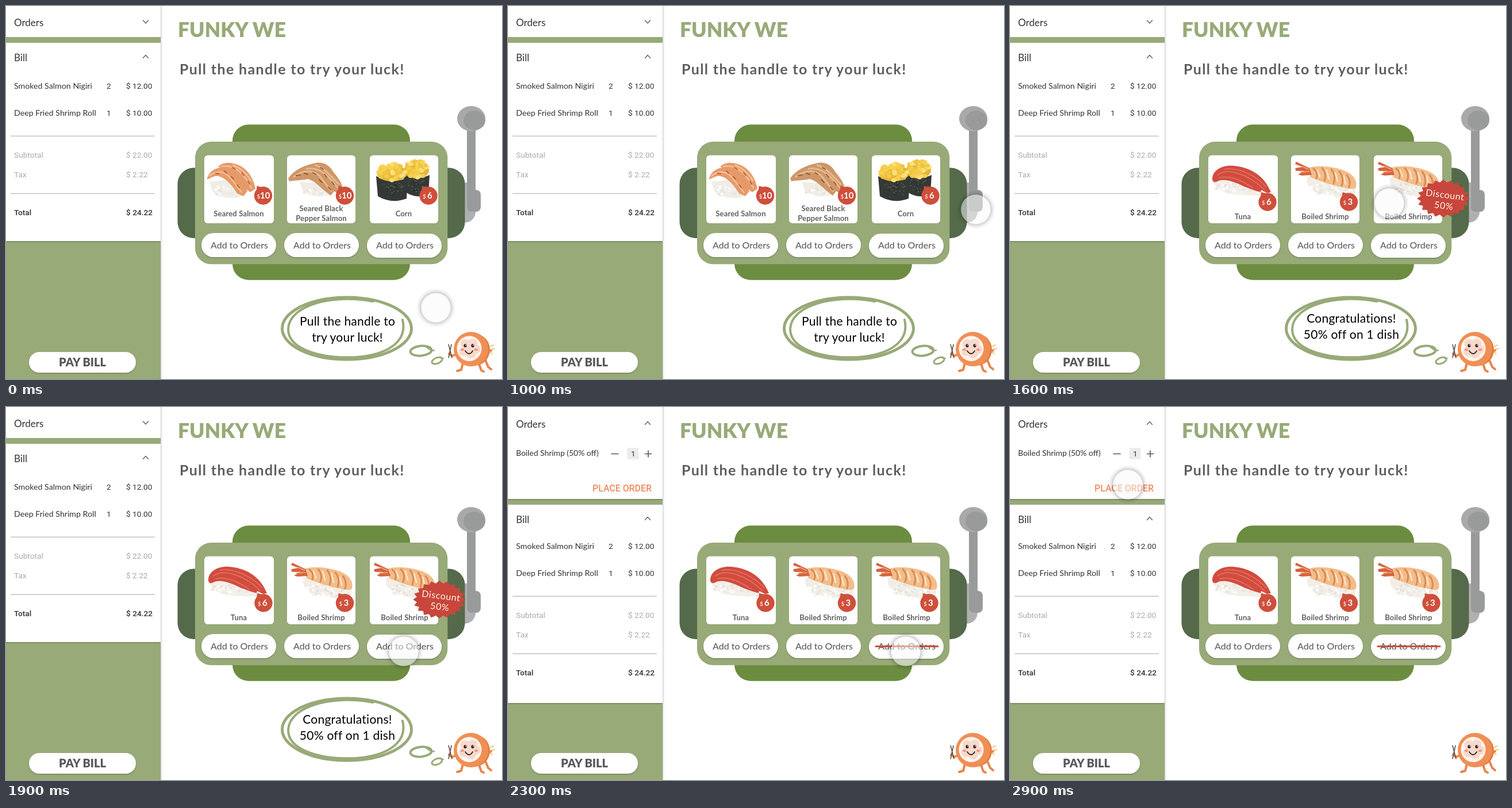
These frames come from a looping animation (863 by 649 pixels, 3 s). An HTML page:

```html
<!DOCTYPE html>
<html lang="en">
<head>
<meta charset="utf-8">
<title>Dish machine</title>
<style>
  html, body { margin: 0; width: 100%; height: 100%; overflow: hidden; background: #fff; }
  svg { display: block; width: 863px; height: 649px; font-family: Lato, sans-serif; }
  .num { font-family: Roboto, sans-serif; font-size: 13.7px; }
  .total { font-weight: 500; }
  .item { font-size: 14.2px; }
  .head { font-size: 17px; }
  .dim { fill: #aaa; }
  .label { font-size: 13px; font-weight: 700; letter-spacing: .15px; fill: #606060; text-anchor: middle; }
  .add { font-size: 16px; font-weight: 500; fill: #606060; text-anchor: middle; }
  .speech { font: 21px "Comic Sans MS", "Comic Neue", Lato, sans-serif; letter-spacing: .25px; fill: #000; text-anchor: middle; }
  .line { fill: none; stroke-linecap: round; stroke-linejoin: round; }
</style>
</head>
<body>
<svg id="stage" viewBox="0 0 863 649"></svg>
<script>
const GREEN = '#98aa78', RED = '#cf4f3b';
const stage = document.getElementById('stage');

const text = (x, y, str, cls = '', extra = '') => `<text x="${x}" y="${y}" class="${cls}" ${extra}>${str}</text>`;
const rect = (x, y, w, h, fill, r = 0, extra = '') =>
  `<rect x="${x}" y="${y}" width="${w}" height="${h}" rx="${r}" fill="${fill}" ${extra}/>`;
const oval = (x, y, rx, ry, fill, extra = '') =>
  `<ellipse cx="${x}" cy="${y}" rx="${rx}" ry="${ry}" fill="${fill}" ${extra}/>`;
const shape = (d, fill) => `<path d="${d}" fill="${fill}"/>`;
const line = (d, color, width = 1.5) => `<path class="line" d="${d}" stroke="${color}" stroke-width="${width}"/>`;
const group = (id, ...parts) => `<g id="${id}">${parts.join('')}</g>`;
const at = (x, y, art) => `<g transform="translate(${x} ${y})">${art}</g>`;
const chevron = (y, up) => line(up ? `M238.5 ${y + 2.5}l4.5-5 4.5 5` : `M238.5 ${y - 2.5}l4.5 5 4.5-5`, '#666');

let seed = 7;
const random = () => (seed = seed * 16807 % 2147483647) / 2147483647;

// Scatters grains inside an ellipse.
function grains(count, cx, cy, rx, ry, size, colors) {
  let out = '';
  for (let i = 0; i < count; i++) {
    const a = random() * 6.283, r = Math.sqrt(random());
    out += oval((cx + rx * r * Math.cos(a)).toFixed(1), (cy + ry * r * Math.sin(a)).toFixed(1),
      size, size * .8, colors[i % colors.length]);
  }
  return out;
}

const RICE = ['#f6f3ee', '#efece6', '#fffefb', '#e6e2db'];

// Dishes are drawn relative to the top left corner of their card.
const searedSalmon = () =>
  shape('M9 46L14 62Q30 76 58 74L72 66L40 42Z', '#f0ece7') + grains(35, 36, 62, 24, 9, 2.6, RICE) +
  shape('M24 20C32 10 50 11 64 19C78 27 86 42 89 58L80 64L72 58C62 40 50 28 36 23Z', '#e59b68') +
  shape('M5 40C8 28 20 20 34 21C54 28 68 46 75 62L68 71L57 66C47 50 36 38 24 36C16 35 10 40 5 42Z', '#e79a68') +
  line('M9 36C22 24 36 28 46 40L65 64M30 19C54 15 70 32 82 57M50 17C64 22 74 32 81 44', '#f4be98', 2.5) +
  line('M20 31l5 1M35 27l4 4M47 37l4 4M57 51l4 5M49 21l5 3M65 30l4 5M76 45l3 5', '#b5623b', 2);

const pepperSalmon = () =>
  shape('M22 46L50 48L82 64C68 74 42 73 28 62Z', '#f1ece4') + grains(26, 48, 63, 24, 7, 2.6, RICE) +
  shape('M2 40C10 28 26 18 46 14C62 9 74 17 80 28C88 38 95 46 97 58L88 66L82 62L76 70L66 62C56 54 48 44 36 41C24 44 10 43 4 45Z', '#cf9668') +
  line('M12 37C30 24 44 25 56 35L77 62M34 23C54 20 70 32 88 56M49 17C66 22 74 34 90 50', '#e5b98f', 3) +
  line('M16 35l7-1M30 31l6 2M45 30l5 3M56 42l5 5M65 33l4 5M78 46l4 5M58 21l5 3M72 55l4 5', '#9b5b38', 2);

function cornRoll(x, y, w, h) {
  const nori = `M${x} ${y}Q${x + w / 2} ${y + 14} ${x + w} ${y + 3}L${x + w - 2} ${y + h - 6}Q${x + w / 2} ${y + h + 4} ${x + 3} ${y + h - 10}Z`;
  return shape(nori, '#343936') + grains(40, x + w / 2, y + h / 2, w / 2 - 5, h / 2 - 8, 1.3, ['#4d5550', '#252a27', '#5a625c']) +
    oval(x + w / 2, y - 5, w / 2 - 1, 14, '#e5b539') +
    grains(50, x + w / 2, y - 7, w / 2 - 3, 15, 4.2, ['#f6d250', '#f0c43f', '#fbe07a', '#f4cc4a']);
}
const corn = () => cornRoll(58, 31, 46, 42) + cornRoll(11, 36, 55, 45);

const tuna = () =>
  shape('M8 44C20 38 48 42 72 58L110 68C94 71 56 70 34 66C20 62 10 54 8 44Z', '#f3efe9') + grains(55, 49, 57, 37, 9, 2.7, RICE) +
  shape('M7 41C7 25 26 16 44 18C78 21 99 39 109 64C94 68 76 59 62 54C46 46 28 39 16 45C11 48 7 46 7 41Z', '#d24c3d') +
  line('M16 34C34 20 72 34 98 60M28 24C54 20 84 36 101 55M20 39C40 34 62 46 78 57', '#e2766a', 1.5) +
  shape('M92 60L104 66L99 72L94 68L89 71Z', '#f3eee7');

const shrimp = () =>
  shape('M30 36C44 38 80 50 109 52C116 60 112 70 104 73C82 75 50 68 36 58C28 52 25 42 30 36Z', '#f2eee7') +
  grains(85, 69, 58, 37, 12, 2.7, RICE) +
  shape('M29 22C46 16 73 19 94 27C108 33 116 43 113 56C107 61 96 56 88 55C70 52 48 44 34 38Z', '#f2bd8b') +
  line('M39 23Q48 30 44 40M54 22Q63 32 58 44M70 24Q79 35 74 49M84 28Q93 39 88 53M97 34Q105 43 101 56', '#de8a50', 3) +
  line('M46 26l4 11M62 26l4 15M77 30l4 15M92 36l3 14', '#fbe1c4', 3) +
  shape('M32 22L9 11L7 15L20 20L8 22Q6 26 10 27L24 27L12 33L18 35L36 34Z', '#d4643f') +
  line('M30 24l-11-5M31 28l-14 1', '#ef9a6c', 2);

function badge(x, y, price) {
  const wide = price.length > 1;
  return shape(`M${x - 11} ${y - 17}L${x} ${y - 14}L${x - 12} ${y - 6}Z`, RED) + oval(x, y, 15.7, 15.7, RED) +
    text(x - (wide ? 11 : 10), y + 4.5, '$', '', 'font-size="10" fill="#fff"') +
    text(x - (wide ? 5.5 : 2), y + 5, price, '', 'font-size="15" font-weight="700" fill="#fff"');
}

const cardX = [345, 489, 633], centerX = [405, 548.5, 693.5];
const dish = (i, art, name) => at(cardX[i], 260, art()) + text(centerX[i], 371, name, 'label');
const speech = (a, b, y) => text(594, y, a, 'speech') + text(594, y + 28, b, 'speech');

const burst = Array.from({ length: 40 }, (_, i) => {
  const a = i * Math.PI / 20, k = i % 2 ? .86 : 1;
  return `${(754 + 46 * k * Math.cos(a)).toFixed(1)},${(335 + 33 * k * Math.sin(a)).toFixed(1)}`;
}).join(' ');

const amounts = [[264, 'Subtotal', '$ 22.00', 'num dim'], [298, 'Tax', '$ 2.22', 'num dim'], [364, 'Total', '$ 24.22', 'num total']];
const dishes = [[144, 'Smoked Salmon Nigiri', 2, '$ 12.00'], [191, 'Deep Fried Shrimp Roll', 1, '$ 10.00']];

const sidebar = rect(0, 0, 269, 649, GREEN) +
  group('billPanel', rect(0, 64, 269, 345, '#fff', 0, 'filter="url(#soft)"'), text(14, 96, 'Bill', 'head'), chevron(88, true)) +
  group('billBody',
    ...dishes.map(([y, name, n, cost]) => text(14, y, name, 'item') + text(175, y, n, 'num') + text(209, y, cost, 'num')),
    ...amounts.map(([y, name, cost, cls]) => text(14, y, name, cls) + text(209, y, cost, cls)),
    rect(8, 225.7, 251, 1.3, '#bbb'), rect(8, 325.7, 251, 1.3, '#bbb')) +
  group('ordersClosed', rect(0, 0, 269, 54, '#fff'), text(14, 35, 'Orders', 'head'), chevron(27.5, false)) +
  group('ordersOpen', rect(0, 0, 269, 160, '#fff', 0, 'filter="url(#soft)"'), text(14, 36, 'Orders', 'head'), chevron(28, true),
    text(14, 85, 'Boiled Shrimp (50% off)', '', 'font-size="13.9"'),
    rect(207.5, 71, 20, 20, '#ececea'), text(214, 86, '1', 'num'),
    line('M180 81.5h12M238.5 81.5h11M244 76v11', '#555', 1.6),
    text(147, 146.5, 'PLACE ORDER', '', 'style="font:500 15.9px Roboto,sans-serif" fill="#ee8b5e"')) +
  rect(40, 602, 186, 36, '#fff', 18, 'filter="url(#soft)"') +
  text(133, 627, 'PAY BILL', '', 'font-size="20" font-weight="900" text-anchor="middle" fill="#585858"') +
  rect(269, 0, 1.5, 649, '#d2d2d2') + rect(270.5, 0, 2, 649, '#f3f3f3');

const machine =
  rect(770, 307, 47, 70, '#b0b0b0', 19) + rect(802, 200, 15, 140, '#999b9b') + rect(802, 320, 24, 38, '#999b9b', 8) +
  oval(809.5, 196, 24.5, 22, '#a9a9a9') + oval(815, 199, 19, 17, '#999b9b') +
  rect(298.5, 281.5, 500, 122.5, '#546a4a', 28) + rect(394, 206.3, 309, 270.4, '#6c8c40', 28) + rect(329, 236, 439.3, 213.3, GREEN, 28) +
  cardX.map((x, i) => rect(x, 259.7, i ? 119 : 121, 118.3, '#fff', 6) +
    rect(x - 5, i > 1 ? 396 : 395, 130, 42, '#fff', 21, 'filter="url(#soft)"') +
    text(x + 61, 421.5, 'Add to Orders', 'add')).join('');

const bubble =
  `<g class="line" stroke="${GREEN}">` +
  oval(593, 561, 112.5, 54, 'none', 'stroke-width="5"') +
  '<path d="M638 514C565 500 492 522 491 562C491 596 544 614 608 611C664 607 699 584 690 546" stroke-width="4"/>' +
  oval(722, 600, 18.5, 8.5, 'none', 'stroke-width="4" transform="rotate(-5 722 600)"') + '<path d="M730 592Q740 601 745 599" stroke-width="2.5"/>' +
  oval(750, 617, 9.5, 5, 'none', 'stroke-width="3" transform="rotate(-22 750 617)"') + '<path d="M755 612l6 1" stroke-width="2"/></g>';

const mascot =
  line('M795 621l-3 12-7 2M822 620l5 14 4 2M834 616l5 12 5 4M785 605l-9 4-5-4M838 604l6-5', '#e98549', 4) +
  line('M770 589l6 23M775 589l-5 23', '#514039', 1.4) +
  line('M843 592l5-2M845 597l5-1M842 602l4 3', '#f3c878', 2) +
  oval(815, 598, 27, 28, '#df7e43') + oval(809, 597, 30, 30, '#f08f55') + oval(806, 596, 21.5, 22, '#fff6ee') +
  [[799, 588], [812, 587], [817, 597], [809, 605], [797, 601]].map(([x, y]) => oval(x, y, 8.5, 8, '#fad8ca')).join('') +
  oval(807, 596, 12, 12, '#fad8ca') + oval(799, 591, 2.6, 3, '#252525') + oval(812, 591, 2.6, 3, '#252525') +
  oval(800, 590, .8, .9, '#fff') + oval(813, 590, .8, .9, '#fff') +
  oval(794, 598, 3, 2, '#ee9587') + oval(818, 598, 3, 2, '#ee9587') +
  line('M799 600Q806 610 812 600', '#252525', 1.8);

stage.innerHTML = `
  <defs>
    <filter id="soft" x="-10%" y="-20%" width="120%" height="150%">
      <feDropShadow dx="0" dy="1.2" stdDeviation="1" flood-opacity=".28"/>
    </filter>
    <radialGradient id="halo">
      <stop offset=".73" stop-color="#000" stop-opacity="0"/><stop offset=".76" stop-opacity=".2"/>
      <stop offset=".86" stop-opacity=".08"/><stop offset="1" stop-opacity="0"/>
    </radialGradient>
  </defs>
  <rect width="863" height="649" fill="#fff"/><g fill="#333">${sidebar}</g>` +
  text(299, 54, 'FUNKY WE', '', `font-size="35.5" font-weight="900" fill="${GREEN}"`) +
  text(302, 119, 'Pull the handle to try your luck!', '', 'font-size="25" font-weight="700" letter-spacing="1.36" fill="#5e5e5e"') +
  machine +
  group('firstSpin',
    at(345, 260, searedSalmon()), text(405, 365.5, 'Seared Salmon', 'label'), badge(447.5, 330, '10'),
    at(489, 260, pepperSalmon()), text(548.5, 357, 'Seared Black', 'label'), text(548.5, 374, 'Pepper Salmon', 'label'), badge(589.5, 330, '10'),
    at(633, 260, corn()), text(692, 365.5, 'Corn', 'label'), badge(735, 330, '6'),
    speech('Pull the handle to', 'try your luck!', 556)) +
  group('secondSpin',
    dish(0, tuna, 'Tuna'), badge(448, 341, '6'), dish(1, shrimp, 'Boiled Shrimp'), badge(589.5, 341, '3'),
    dish(2, shrimp, 'Boiled Shrimp')) +
  group('discount', `<polygon points="${burst}" fill="#c8463c"/>`,
    '<g transform="rotate(7 755 337)" fill="#fff3e6" text-anchor="middle" font-size="16" letter-spacing=".6">',
    text(756, 334, 'Discount'), text(756, 353, '50%'), '</g>', speech('Congratulations!', '50% off on 1 dish', 551)) +
  group('bubble', bubble) +
  group('ordered', badge(733, 341, '3'), line('M640 416.5h108', RED, 3)) +
  mascot +
  group('cursor', oval(0, 0, 34, 34, 'url(#halo)'), oval(0, 0, 26, 26, '#fafafa', 'opacity=".5"'));

// Touch path: time, x, y.
const path = [
  [0, 748, 525], [400, 835, 323], [600, 814, 354], [1200, 814, 354], [1600, 660, 343],
  [1800, 692, 425], [2300, 692, 425], [2800, 205, 135], [3000, 205, 135]
];

const find = id => document.getElementById(id);
const show = (id, on) => find(id).setAttribute('visibility', on ? 'visible' : 'hidden');
const shift = (id, x, y) => find(id).setAttribute('transform', `translate(${x} ${y})`);

function draw(time) {
  const t = Math.floor(time % 3000 / 100) * 100;
  const spun = t >= 1100, ordered = t >= 2300;
  show('firstSpin', !spun);
  show('secondSpin', spun);
  show('discount', spun && !ordered);
  show('bubble', !ordered);
  show('ordered', ordered);
  show('ordersOpen', ordered);
  show('ordersClosed', !ordered);
  shift('billPanel', 0, ordered ? 106 : 0);
  shift('billBody', 0, ordered ? 103 : 0);

  const i = path.findIndex(p => p[0] > t), from = path[i - 1], to = path[i];
  const u = (t - from[0]) / (to[0] - from[0]), ease = u * u * (3 - 2 * u);
  const [, x, y] = from.map((v, k) => v + (to[k] - v) * ease);
  shift('cursor', x, y);
}

const start = performance.now();
function tick() {
  draw(performance.now() - start);
  requestAnimationFrame(tick);
}
tick();
</script>
</body>
</html>
```
